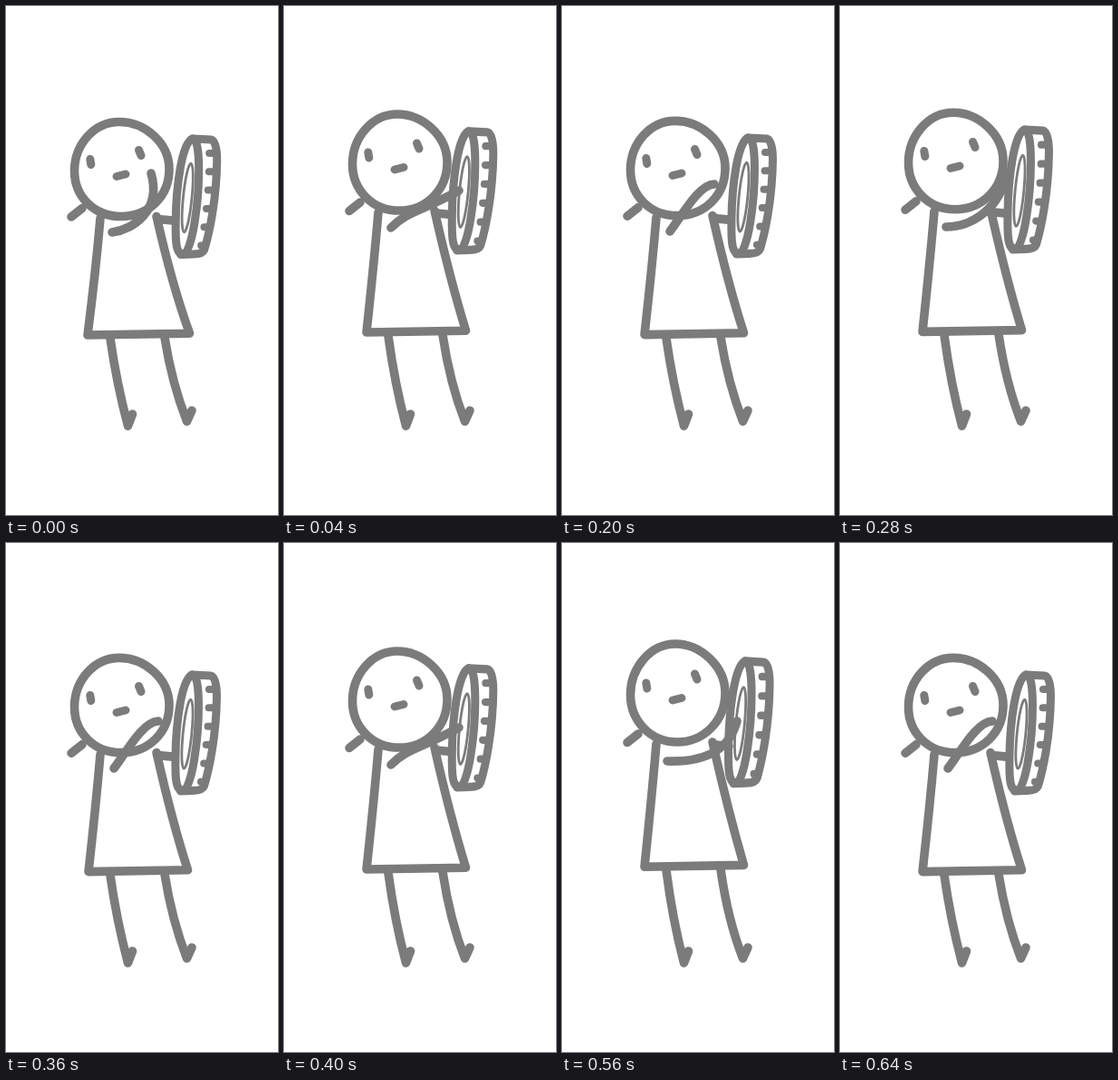
Animation of 300 by 560 pixels, one loop 0.68 s. Source, as an HTML page with a canvas:

```html
<!DOCTYPE html>
<html lang="en">
<head>
<meta charset="utf-8">
<title>Tyre drummer</title>
<style>
  html, body { margin: 0; width: 100%; height: 100%; overflow: hidden; background: #fff; }
  canvas { display: block; }
</style>
</head>
<body>
<canvas id="stage" width="300" height="560"></canvas>
<script>
const ctx = document.getElementById('stage').getContext('2d');
const STEP = 40;
const ORDER = '02350134512402351';

// One swing: how far the body is raised, and the curve of the beating arm.
const POSES = [
  { lift: 0,    arm: 'M117 249C140 246 172 225 160 184' },
  { lift: 1,    arm: 'M119 248C133 230 150 197 168 196' },
  { lift: 7.5,  arm: 'M118 244C135 226 152 226 193 203' },
  { lift: 14.5, arm: 'M116 240C150 241 183 233 193 196' },
  { lift: 9,    arm: 'M117 243C145 243 178 222 183 184' },
  { lift: 1,    arm: 'M116 248C140 245 172 224 160 184' }
];

function stroke(d, width = 9.6) {
  ctx.lineWidth = width;
  ctx.stroke(new Path2D(d));
}

function drawTyre(lift) {
  const top = 145.5, height = 127.5;
  ctx.save();
  ctx.translate(-0.25 * lift - 0.3, top - 1.1 * lift);
  ctx.scale(1, 1 + 0.48 * lift / height);
  ctx.translate(0, -top);

  // Side wall, hub, tread edge, tread blocks
  stroke('M206 146C194 150 188 200 187.5 235C187 262 188 273 196 273C206 270 213 215 213 180C213 155 210 146 206 146Z', 9);
  ctx.lineWidth = 2.8;
  ctx.beginPath();
  ctx.ellipse(200.5, 211, 4.8, 38, 0.1, 0, Math.PI * 2);
  ctx.stroke();
  stroke('M206 146L226 147Q233 148 233 170C232.5 215 224 252 219 268Q217 273 207 273L193 273.5', 9);
  for (let i = 0; i < 6; i++) {
    stroke(`M${224.5 - 0.36 * i * i} ${162 + 20.3 * i}h5`, 8);
  }
  ctx.restore();
}

function drawBody(lift) {
  const hem = 362 - 0.4 * lift;
  const right = lift ? 200.5 : 202.5;
  const left = lift ? 91 : 90;
  const cy = 179.5 - lift;
  const ry = 52 + 0.14 * lift;
  const crown = cy - ry;
  const neck = cy + ry;

  stroke(`M104 ${neck + 2}Q99 ${neck + 60} ${left} ${hem}L${right} ${hem - 1.8}Q183 ${neck + 75} 166 ${neck}`);
  stroke(`M115 ${hem + 4}Q122 415 134.5 462L139.5 449`);
  stroke(`M175 ${hem + 3}Q183 415 199.5 457L205 445`);
  stroke(`M72 ${neck + 0.5}L84 ${neck - 9}`);
  stroke(`M168 ${neck + 3}L184 ${neck + 4.5}`);

  stroke(`M125 ${crown}C152 ${crown} 180 ${cy - 30} 180 ${cy}C180 ${cy + 30} 157 ${neck} 127 ${neck}` +
    `C97 ${neck} 75.5 ${cy + 30} 75.5 ${cy + 2}C75.5 ${cy - 27} 97 ${crown} 125 ${crown}Z`);
  stroke(`M92.8 ${cy - 11}l1 6`, 9);
  stroke(`M146.5 ${cy - 21}l2.5 6`, 9);
  stroke(`M122 ${cy + 8}l10 -2.5`, 9);
}

function draw(now) {
  const step = Math.floor(now / STEP) % ORDER.length;
  const { lift, arm } = POSES[ORDER[step]];
  ctx.fillStyle = '#fff';
  ctx.fillRect(0, 0, 300, 560);
  ctx.strokeStyle = '#7b7b7b';
  ctx.lineCap = ctx.lineJoin = 'round';
  drawTyre(lift);
  drawBody(lift);
  stroke(arm);
}

const start = performance.now();
function tick() {
  draw(performance.now() - start);
  requestAnimationFrame(tick);
}
tick();
</script>
</body>
</html>
```
